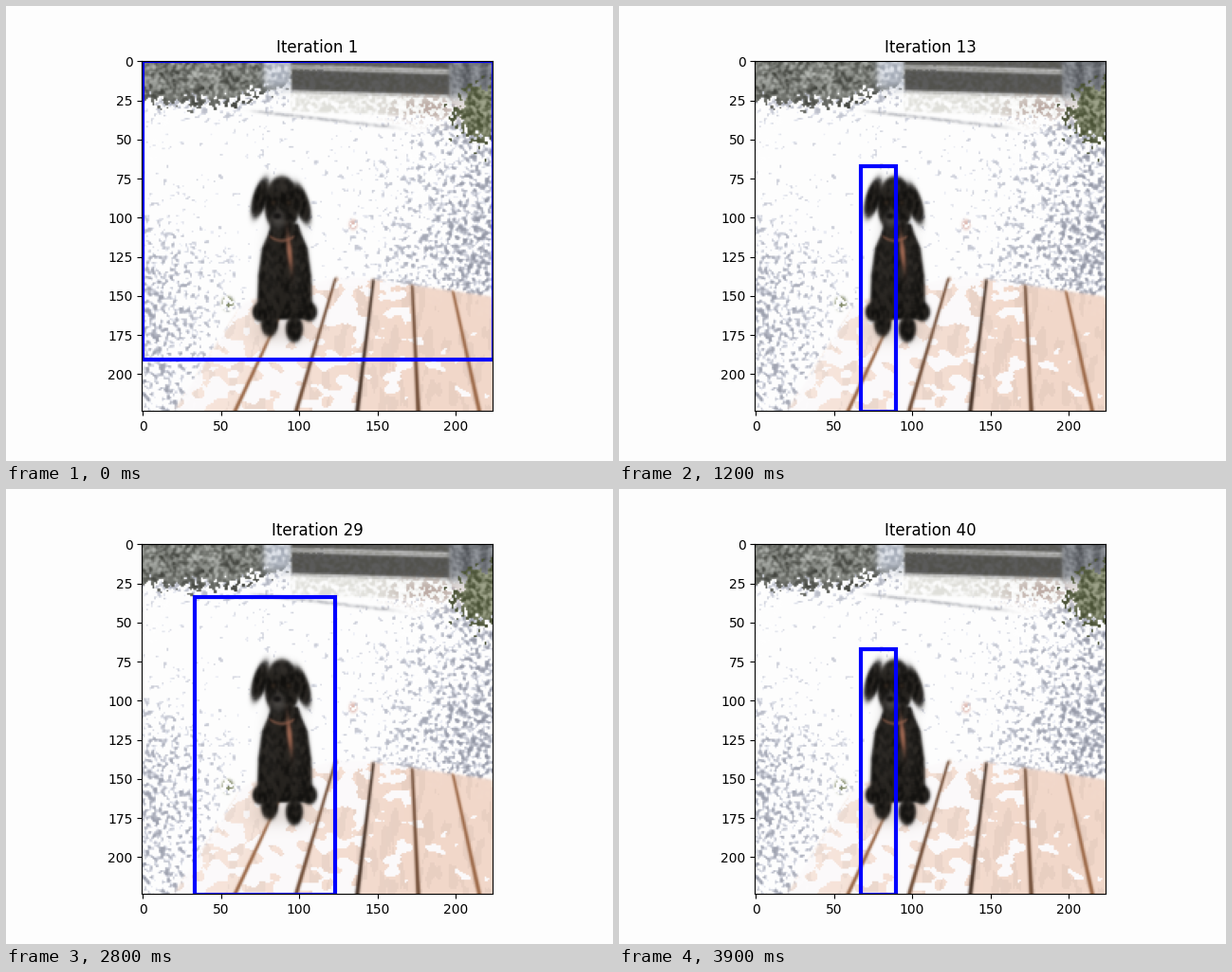
Write a matplotlib script that moves like this. It is 640 by 480 pixels and loops after 4000 ms.

```python
import numpy as np
import matplotlib.pyplot as plt
from matplotlib.animation import FuncAnimation
from matplotlib.patches import Rectangle

N = 224                               # photo size in its own pixels
STEP = 0.15 * N                       # one move of the search box
FRAMES, INTERVAL = 40, 100
SCALE, LEFT, TOP = 1.65, 143.2, 57.6  # photo pixels to stage pixels

rng = np.random.default_rng(4)
cells = (np.arange(N) + 0.5) * SCALE
X, Y = np.meshgrid(LEFT + cells, TOP + cells)


# ---------- painting helpers, in stage pixels ----------
def sig(v):
    return 1 / (1 + np.exp(-np.clip(v, -40, 40)))


def rgb(*c):
    return np.array(c) / 255


def mix(a, b, t):
    return a + (b - a) * np.asarray(t)[..., None]


def noise(kx, ky):
    """Smoothed random field whose values are spread evenly over 0..1."""
    a = rng.random((N, N))
    for axis, k in ((1, kx), (0, ky)):
        for _ in range(2):
            a = sum(np.roll(a, s, axis) for s in range(k))
    rank = a.ravel().argsort().argsort()
    return rank.reshape(N, N) / (N * N - 1)


def span(v, lo, hi, soft=0.6):
    """Soft mask of lo < v < hi."""
    return sig((v - lo) / soft) * sig((hi - v) / soft)


def blob(cx, cy, rx, ry, lean=0, soft=0.8):
    r = np.hypot((X - cx - lean * (Y - cy)) / rx, (Y - cy) / ry)
    return sig((1 - r) * min(rx, ry) / soft)


def paint(img, m, color):
    img[:] = mix(img, color, m)


# ---------- the scene ----------
def gravel(img):
    right = 0.6 * sig((X - 455 + 0.25 * (Y - 130)) / 24) * sig((Y - 112) / 8)
    left = 0.5 * sig((Y - 245) / 16) * sig((205 - X) / 18)
    upper = 0.6 * sig((104 - Y) / 7) * sig((290 - X) / 15)
    density = 0.03 + right + left + upper
    n = noise(2, 2)
    depth = np.clip((n - 1 + density) / density, 0, 1)
    stones = mix(rgb(238, 240, 247), rgb(136, 140, 155), depth * np.clip(0.3 + density, 0, 1))
    paint(img, n > 1 - density, stones)


def garden(img):
    fine, coarse = noise(2, 2), noise(6, 4)
    foliage = mix(rgb(62, 64, 58), rgb(184, 187, 182), 0.6 * fine + 0.4 * coarse)
    edge = 103 - 0.0022 * (X - 195)**2
    paint(img, sig((edge - Y) / 5) > 0.8 * fine + 0.1, foliage)
    paint(img, span(X, 272, 302, 2) * span(Y, 50, 88, 3),
          mix(rgb(165, 172, 184), rgb(226, 230, 237), fine))

    # stone step: dark back, worn tread, riser, bright ledge with a shaded rim
    level = Y - 0.03 * (X - 302)
    wide = span(X, 301, 468)
    tones = (100, 172, 92, 196, 254)
    tops = (50, 63, 67.5, 90, 93, 112)
    for tone, lo, hi in zip(tones, tops, tops[1:]):
        paint(img, wide * span(level, lo, hi), mix(rgb(*[tone] * 3), rgb(tone, tone, tone - 6) * 0.88, fine))
    rim = span(Y - 0.115 * (X - 265), 110.5, 113.5) * span(X, 264, 410, 4)
    paint(img, rim * (0.4 + 0.5 * fine), rgb(172, 174, 180))
    paint(img, blob(446, 109, 30, 11, soft=4) * (fine > 0.6) * 0.7, rgb(168, 142, 134))

    # posts and grass on the right
    posts = mix(rgb(78, 81, 86), rgb(150, 154, 160), 0.5 * fine + 0.25 * (1 + np.sin(X / 3)))
    paint(img, sig((X - 467) / 1.2) * sig((97 - Y) / 3), posts)
    paint(img, blob(505, 112, 29, 28, soft=4) > 0.9 * fine,
          mix(rgb(72, 80, 52), rgb(160, 165, 140), fine))
    paint(img, blob(234, 314, 6, 7) * (fine > 0.4), rgb(126, 134, 100))
    paint(img, blob(366, 231, 4, 5) * (fine > 0.4), rgb(222, 186, 178))


def deck(img):
    # the planks converge: u counts planks from the left edge
    depth = Y - 428
    width = 64.4 + 0.172 * depth
    u = (X - 177 + 0.64 * depth) / width
    edge = 287 + np.maximum(0, np.maximum(0.27 * (346 - X), 0.145 * (X - 375)))
    floor = sig((Y - edge) / 0.8) * sig(u * width)
    k = np.floor(u)
    grain, patch = noise(3, 9), noise(7, 5)
    wood = mix(rgb(247, 230, 221), rgb(242, 216, 202), np.clip(u / 4, 0, 1))
    wood = mix(wood, wood * 0.96, grain > 0.65)
    bare = 0.1 + 0.75 * np.exp(-(k - 1)**2 / 1.5)
    paint(img, floor, mix(wood, rgb(252, 250, 251), patch < bare))

    gap = np.round(u)
    ink = mix(rgb(66, 46, 34), rgb(152, 100, 66), np.abs(gap - 3) / 2)
    near = sig((2.1 + 0.006 * depth - np.abs(u - gap) * width) / 0.6)
    paint(img, floor * near * (gap > 0) * (gap < 6), ink)


def dog(img):
    fur = mix(rgb(16, 15, 13), rgb(38, 35, 31), noise(2, 3))
    for s in (-1, 1):
        paint(img, blob(292 + 14 * s, 343, 17, 10, soft=4) * 0.4, rgb(196, 182, 172))

    half = np.interp(Y, (230, 242, 256, 285, 318, 332), (14, 18, 24, 28, 29, 25))
    paint(img, sig((half - np.abs(X - 294)) / 0.8) * span(Y, 230, 331), fur)
    paint(img, blob(291, 210, 18.5, 30), fur)
    for s in (-1, 1):
        paint(img, blob(290 + 22 * s, 206 + 3 * s, 8, 21, lean=0.25 * s), fur)
        paint(img, blob(294 + 26 * s, 323, 8, 10), fur)
        paint(img, blob(291 + 13 * s, 338 + 3 * s, 9, 14), fur)

    # soft lights, muzzle and eyes
    light = rgb(74, 70, 66)
    for s in (-1, 1):
        paint(img, blob(293 + 14 * s, 278, 6, 26, soft=3) * 0.3, light)
        paint(img, blob(290 + 8 * s, 208, 2, 2), rgb(48, 38, 30))
    paint(img, blob(289, 190, 9, 5, soft=2) * 0.4, light)
    paint(img, blob(287, 226, 7, 9, soft=2) * 0.8, rgb(84, 81, 78))
    paint(img, blob(286, 222, 4, 3), rgb(20, 18, 18))

    strap = rgb(160, 104, 82)
    bend = 243 + 5 * np.cos((X - 291) / 9)
    paint(img, span(Y - bend, -1.5, 1.5) * span(X, 278, 304) * 0.6, strap)
    paint(img, blob(299, 260, 2.5, 15, lean=0.1), strap)


def scene():
    img = np.ones((N, N, 3)) * rgb(254, 254, 254)
    for part in (gravel, garden, deck, dog):
        part(img)
    return np.clip(img, 0, 1)


# ---------- the box search ----------
MOVES = {                             # change of x0, x1, y0, y1 in steps
    "up": (0, 0, -1, -1), "down": (0, 0, 1, 1),
    "left": (-1, -1, 0, 0), "right": (1, 1, 0, 0),
    "taller": (1, -1, 0, 0), "bigger": (-1, 1, -1, 1),
}
START = "up up taller taller down down right left left taller".split()
LOOP = "bigger down taller".split()


def search():
    box = np.array([0, N, 0, N], float)
    boxes = []
    for move in (START + LOOP * FRAMES)[:FRAMES]:
        box = np.clip(box + STEP * np.array(MOVES[move]), 0, N)
        boxes.append(box)
    return boxes


boxes = search()
fig, ax = plt.subplots(figsize=(6.4, 4.8), dpi=100, facecolor="#fdfdfd")
ax.imshow(scene())
frame = ax.add_patch(Rectangle((0, 0), 1, 1, fill=False, edgecolor="blue", linewidth=3))
title = ax.set_title("Iteration 1")


def update(i):
    x0, x1, y0, y1 = boxes[i]
    frame.set_bounds(x0, y0, x1 - x0, y1 - y0)
    title.set_text(f"Iteration {i + 1}")
    return frame, title


anim = FuncAnimation(fig, update, frames=FRAMES, interval=INTERVAL,
                     init_func=lambda: update(0), repeat=True, repeat_delay=0)
plt.show()
```
